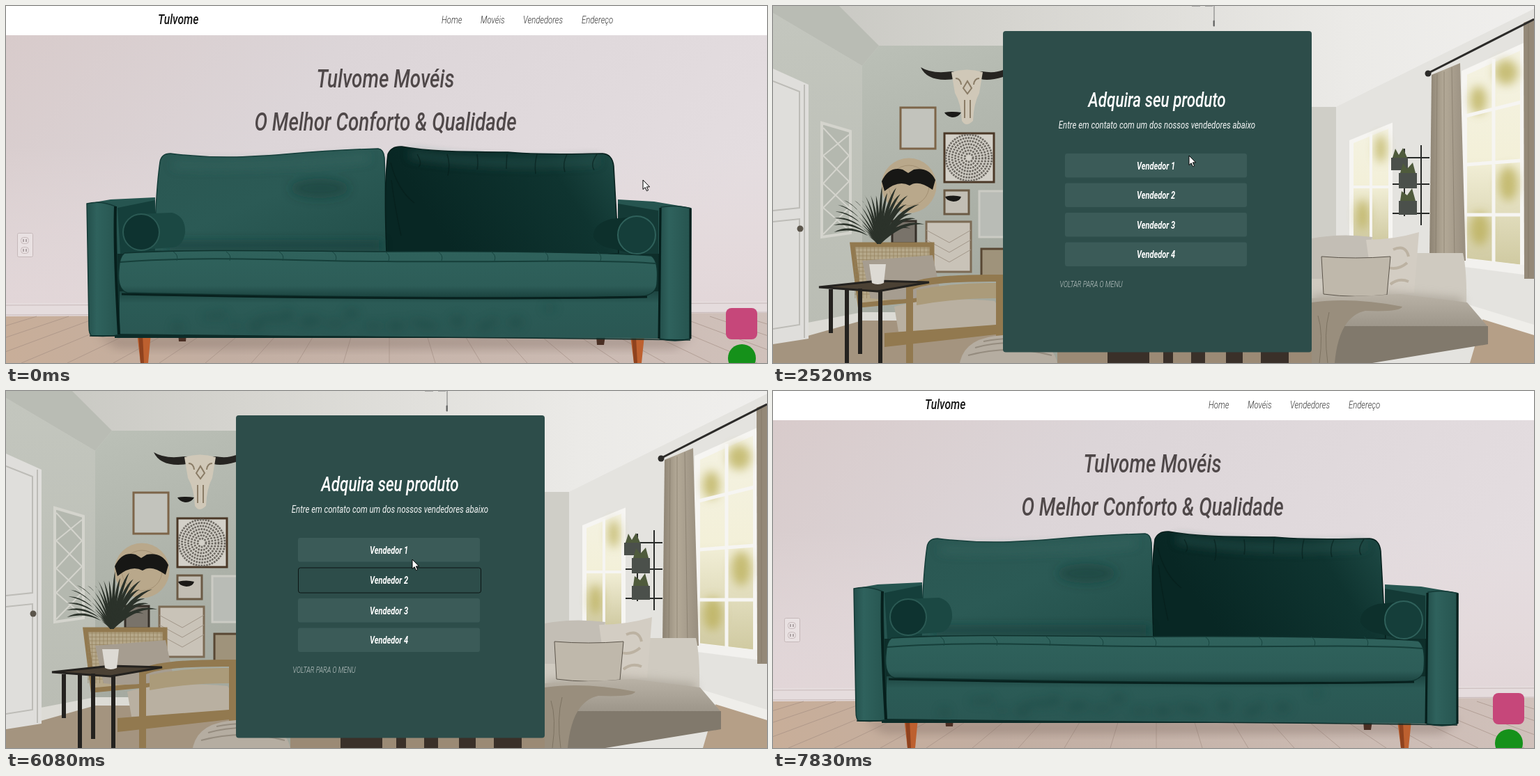
Write an HTML page that moves like this. It is 1092 px wide and 513 px high and loops after 8.49 s.

```html
<!DOCTYPE html>
<html lang="pt">
<head>
<meta charset="utf-8">
<title>Tulvome</title>
<style>
  html, body { margin: 0; width: 100%; height: 100%; overflow: hidden; background: #fff; }
  svg { display: block; width: 100vw; height: 100vh; }
  text { font-family: Roboto, "Open Sans", sans-serif; font-style: italic; }
</style>
</head>
<body>
<svg viewBox="0 0 1092 513" preserveAspectRatio="none">
  <defs>
    <linearGradient id="wall" x2="1" y2=".35">
      <stop stop-color="#d8cbcb"/><stop offset=".4" stop-color="#dcd5d8"/><stop offset="1" stop-color="#e4dde0"/>
    </linearGradient>
    <linearGradient id="wallLow" x2="0" y2="1">
      <stop offset=".4" stop-color="#e6dadb" stop-opacity="0"/><stop offset="1" stop-color="#e2d6d8"/>
    </linearGradient>
    <linearGradient id="floor">
      <stop stop-color="#c8ae99"/><stop offset=".3" stop-color="#c2aea2"/><stop offset="1" stop-color="#d0c1bb"/>
    </linearGradient>
    <linearGradient id="backL" x2=".9" y2="1">
      <stop stop-color="#2a5752"/><stop offset=".5" stop-color="#2b5a55"/><stop offset="1" stop-color="#23504b"/>
    </linearGradient>
    <linearGradient id="backR" x2="1" y2="-.3">
      <stop stop-color="#082724"/><stop offset=".6" stop-color="#0f3430"/><stop offset="1" stop-color="#24524d"/>
    </linearGradient>
    <linearGradient id="seat" x2="0" y2="1">
      <stop stop-color="#2f625c"/><stop offset=".75" stop-color="#2d5d58"/><stop offset="1" stop-color="#1a423e"/>
    </linearGradient>
    <linearGradient id="base" x2="0" y2="1">
      <stop stop-color="#1d4541"/><stop offset=".25" stop-color="#2b5b56"/><stop offset="1" stop-color="#2a5753"/>
    </linearGradient>
    <linearGradient id="arm">
      <stop stop-color="#234f4b"/><stop offset=".3" stop-color="#2f625d"/><stop offset="1" stop-color="#26544f"/>
    </linearGradient>
    <linearGradient id="roomWall" x2=".3" y2="1">
      <stop stop-color="#bbc0b7"/><stop offset=".5" stop-color="#adb2a9"/><stop offset="1" stop-color="#a0a59b"/>
    </linearGradient>
    <linearGradient id="sideWall" x2="0" y2="1">
      <stop stop-color="#c3c6be"/><stop offset="1" stop-color="#b9bcb3"/>
    </linearGradient>
    <linearGradient id="ceil">
      <stop stop-color="#c6c6c0"/><stop offset=".3" stop-color="#d5d4cf"/><stop offset=".75" stop-color="#ebeae7"/><stop offset="1" stop-color="#f0efed"/>
    </linearGradient>
    <linearGradient id="glass" x2="0" y2="1">
      <stop stop-color="#f4f2e2"/><stop offset=".5" stop-color="#f3f0d9"/><stop offset="1" stop-color="#cfc9a0"/>
    </linearGradient>
    <linearGradient id="drape">
      <stop stop-color="#8c8272"/><stop offset=".4" stop-color="#b3a997"/><stop offset="1" stop-color="#988e7f"/>
    </linearGradient>
    <linearGradient id="chaise" x2="0" y2="1">
      <stop stop-color="#b9b2a6"/><stop offset="1" stop-color="#9c9589"/>
    </linearGradient>
    <filter id="soft" x="-50%" y="-50%" width="200%" height="200%"><feGaussianBlur stdDeviation="7"/></filter>
  </defs>

  <g id="home">
    <rect y="42" width="1092" height="471" fill="url(#wall)"/>
    <rect y="42" width="1092" height="400" fill="url(#wallLow)"/>
    <path d="M0 427L1092 424V442L0 446Z" fill="#e5dcdd"/>
    <path d="M0 430L1092 427M0 444L1092 440" stroke="#c7b9b9" fill="none"/>
    <path d="M0 446L1092 441V513H0Z" fill="url(#floor)"/>
    <g id="planks" stroke="#a08b80" stroke-width="1" opacity=".6"/>
    <path d="M130 474H985L960 492H160Z" fill="#7a675e" opacity=".4" filter="url(#soft)"/>
    <g stroke="#c5b8b9" fill="#e9e1e2">
      <rect x="16.500" y="326.500" width="22" height="34" rx="2"/>
      <rect x="21.500" y="332.500" width="11" height="9" rx="4"/><rect x="21.500" y="346.500" width="11" height="9" rx="4"/>
      <path d="M25 335v4m4-4v4M25 349v4m4-4v4" stroke="#75686a"/>
    </g>
    <path d="M247 470h12l-1 12h-10zM847 474h13l-2 13h-10z" fill="#4a2f24"/>
    <path d="M188 470h20l-4 43h-11z" fill="#bd602f"/><path d="M896 474h20l-4 39h-11z" fill="#bd602f"/>
    <path d="M190 472h6l2 41h-5zM898 476h6l2 37h-5z" fill="#8f421e"/>

    <path d="M156 345H942V477H156Z" fill="#0e2e2a"/>
    <path d="M116 284L150 278L214 275L216 356H160Z" fill="#265550"/>
    <path d="M160 290L214 279V356H164Z" fill="#153f3b"/>
    <path d="M983 290L930 281L878 278V356H940Z" fill="#265550"/>
    <path d="M936 294L878 284V356H936Z" fill="#143a36"/>
    <path d="M213 352C214 300 217 252 221 224Q223 212 236 212C300 220 350 217 400 213C460 208 500 206 534 205Q542 206 543 218L547 354Z" fill="url(#backL)" stroke="#143d39" stroke-width="1.500"/>
    <path d="M546 356C544 300 543 250 548 213Q553 201 568 202C620 211 670 209 720 210C780 215 820 212 856 212Q870 213 872 230L879 356Z" fill="url(#backR)" stroke="#061f1c" stroke-width="1.500"/>
    <g filter="url(#soft)">
      <ellipse cx="450" cy="262" rx="42" ry="14" fill="#153e3a" opacity=".5"/>
      <path d="M240 228Q370 232 520 218" stroke="#3c6c66" stroke-width="9" fill="none" opacity=".5"/>
      <path d="M580 213Q700 232 850 222" stroke="#2f5d57" stroke-width="8" fill="none" opacity=".7"/>
      <path d="M230 344H540" stroke="#163e3a" stroke-width="8"/>
    </g>
    <path id="folds" stroke="#071f1c" stroke-width="1.500" fill="none" opacity=".6"/>
    <path d="M186 299L238 297Q258 302 257 326Q254 345 238 347L194 350Z" fill="#1b4843"/>
    <ellipse cx="194" cy="325" rx="26" ry="26" fill="#0e3330" stroke="#2b5a54" stroke-width="2"/>
    <path d="M914 302L868 306Q842 313 843 332Q850 346 872 349L902 357Z" fill="#0d302c"/>
    <ellipse cx="905" cy="329" rx="27" ry="27" fill="#153e3a" stroke="#2f615b" stroke-width="2"/>

    <path d="M163 410H938V478Q560 476 163 471Z" fill="url(#base)"/>
    <path d="M170 355C270 349 390 352 545 353C700 352 860 354 926 359Q937 366 934 400Q932 417 905 418C650 421 400 417 174 412Q159 408 162 378Q163 360 170 355Z" fill="url(#seat)" stroke="#0f322e" stroke-width="1.500"/>
    <path d="M164 368C300 358 420 367 545 367C700 369 850 363 933 370" stroke="#163f3a" stroke-width="2" fill="none"/>
    <path id="tufts" stroke="#184540" fill="none"/>
    <path d="M166 414C400 419 700 422 920 418" stroke="#08211e" stroke-width="3" fill="none"/>
    <g id="scuffs" fill="#163f3b" opacity=".32" filter="url(#soft)"/>
    <path d="M116 284Q136 279 157 288L163 470Q160 476 123 474Q119 472 119 460Z" fill="url(#arm)" stroke="#143a36" stroke-width="1.500"/>
    <path d="M157 288Q155 350 162 472" stroke="#061f1c" stroke-width="4" fill="none"/>
    <path d="M940 289Q962 285 983 291L982 478Q960 484 938 478Z" fill="url(#arm)" stroke="#143a36" stroke-width="1.500"/>
    <path d="M939 290L937 478M982 291V478" stroke="#061f1c" stroke-width="3" fill="none"/>
    <path d="M120 474Q560 474 982 480" stroke="#0d2b28" stroke-width="1.500" fill="none"/>

    <rect width="1092" height="42" fill="#fff"/>
    <rect id="underline" x="741" y="29" height="1" fill="#222"/>
    <rect x="1033" y="434" width="45" height="45" rx="8" fill="#c6477a"/>
    <circle cx="1056" cy="506" r="20" fill="#15911a"/>
  </g>

  <g id="room">
    <rect width="1092" height="513" fill="url(#ceil)"/>
    <path d="M0 0H95L152 57L128 86L0 10Z" fill="#b9bcb4"/>
    <path d="M0 10L128 86V513H0Z" fill="url(#sideWall)"/>
    <path d="M128 86L152 57H560V513H128Z" fill="url(#roomWall)"/>
    <path d="M770 145H808L1092 4V513H770Z" fill="#e4e3df"/>
    <path d="M770 145H808V340H770Z" fill="#cfcec7"/>
    <path d="M0 470L130 448H330V513H0Z" fill="#a4947f"/>
    <path d="M50 455L128 440H200V452H128L50 474Z" fill="#dcdbd5"/>
    <path d="M0 90L51 113V478L0 486Z" fill="#dfdedb"/>
    <path d="M45 113V477M0 108L38 123V290L0 294M0 310L38 306V458L0 464" stroke="#bdbcb7" stroke-width="2" fill="none"/>
    <circle cx="39" cy="320" r="4.500" fill="#5b554b"/>
    <path d="M633 0V29" stroke="#777"/><path d="M632 21h1.500v8h-1.500zM601 0h12M620 0h11" stroke="#777" fill="#444"/>

    <path d="M70 168L111 180V326L70 332Z" fill="#b4b8af" stroke="#d4d4cd" stroke-width="4"/>
    <path d="M72 175L109 215L72 255L109 290L72 328M109 185L72 215L109 252L72 290L109 322" stroke="#d4d4cd" stroke-width="2" fill="none"/>
    <g id="frames" stroke-width="3"/>
    <g id="rings" fill="none" stroke="#6f6b64"/>
    <path d="M220 322l33 18l31-18m-64 14l33 18l31-18m-64 14l33 18l31-18" stroke="#a2978a" fill="none"/>
    <circle cx="195" cy="258" r="39.500" fill="#b9a88b"/>
    <circle cx="195" cy="258" r="29" fill="none" stroke="#a39073" stroke-width="1"/>
    <path d="M156 252Q166 230 186 235L194 240L202 235Q224 231 233 250L229 264Q208 249 196 258Q180 249 160 266Z" fill="#171715"/>
    <path d="M246 153q12-2 24 0q-4 7-12 7q-9-1-12-7zM247 274q12-3 23 0q-2 7-11 7q-10-1-12-7z" fill="#1a1917"/>
    <path d="M212 88Q228 98 256 94H300Q318 97 330 92V102Q310 108 298 105H260Q222 110 212 88Z" fill="#262421"/>
    <path d="M256 95Q278 88 301 95L296 125Q288 140 287 165Q277 175 271 165Q270 140 261 125Z" fill="#d0c8b8"/>
    <path d="M262 104q7 0 8 9M296 104q-7 0-8 9M273 118l6-10l6 10l-6 8zM275 135v26M283 135v26" stroke="#8a7c66" stroke-width="2" fill="none"/>

    <path d="M114 343H228V420L125 430Z" fill="#b5a789" stroke="#92794f" stroke-width="7"/>
    <path id="cane" stroke="#94815d" stroke-width=".7" fill="none"/>
    <g id="palm" fill="#2b322a"/>
    <path d="M128 366Q180 362 229 358L241 414Q180 426 140 420Z" fill="#a69d90"/>
    <path d="M174 432Q230 416 318 424Q330 440 318 462L180 468Z" fill="#b9b0a1"/>
    <path d="M196 513V404Q220 390 325 391V485" stroke="#92794f" stroke-width="10" fill="none"/>
    <path d="M206 408Q260 397 320 398V420Q260 420 206 430Z" fill="#ab9b7a"/>
    <path d="M160 470L320 458V472L160 490Z" fill="#92794f"/>
    <path d="M66 404L150 395L224 397L150 410Z" fill="#4b4134" stroke="#24221f" stroke-width="3"/>
    <path d="M106 408V513M154 410V513M83 407V470M125 406V500" stroke="#24221f" stroke-width="6"/>
    <path d="M138 371H162L159 398Q150 402 142 398Z" fill="#dddad4"/>
    <path d="M268 513Q275 476 330 473Q400 474 408 513Z" fill="#b5ada1"/>
    <path d="M280 502q60-16 120 0M290 491q50-14 102 0M302 482q40-8 76 0" stroke="#958c7f" stroke-width="2" fill="none"/>
    <rect x="408" y="495" width="366" height="18" fill="#9b8a75"/>
    <path d="M480 495h60v18h-60zM560 495h14v18h-14zM600 495h20v18h-20zM650 495h24v18h-24zM700 495h40v18h-40z" fill="#3a3029"/>

    <path d="M830 195L886 172V340H830Z" fill="url(#glass)" stroke="#f6f5f2" stroke-width="6"/>
    <path d="M992 96L1076 58V376L992 366Z" fill="url(#glass)" stroke="#f6f5f2" stroke-width="8"/>
    <g fill="#b9ad55" filter="url(#soft)" opacity=".75">
      <ellipse cx="872" cy="205" rx="8" ry="20"/><ellipse cx="846" cy="300" rx="9" ry="22"/>
      <ellipse cx="1052" cy="95" rx="17" ry="18"/><ellipse cx="1012" cy="135" rx="12" ry="20"/>
      <ellipse cx="1055" cy="255" rx="14" ry="25"/><ellipse cx="1014" cy="320" rx="14" ry="24"/>
    </g>
    <path d="M858 184V340M830 260H886" stroke="#f6f5f2" stroke-width="4"/>
    <path d="M1034 76V372M994 158L1074 138M994 228L1074 222M994 300L1074 300" stroke="#f6f5f2" stroke-width="5"/>
    <path d="M889 218H942M889 256H942M889 298H942M930 200V315M906 205V302" stroke="#292b29" stroke-width="2"/>
    <path d="M887 218h24v18h-24zM898 240h26v22h-26zM898 280h26v20h-26z" fill="#4b504b"/>
    <path d="M889 218l4-13l5 9l6-10l6 14zM900 240l4-14l6 8l8-9l4 15zM900 280l2-14l8 6l7-10l5 18z" fill="#4f5b3c"/>
    <path d="M985 362L1092 374V388L985 374Z" fill="#f2f1ee"/>
    <path d="M945 99L986 82L994 366H942Z" fill="url(#drape)"/><path d="M1077 24L1092 18V392H1078Z" fill="#948978"/>
    <path d="M953 98L951 364M963 94V364M974 88L978 364M1084 22V390" stroke="#7d7363" opacity=".6"/>
    <path d="M939 97L1092 19" stroke="#2c2b29" stroke-width="3"/><circle cx="940" cy="97" r="4.500" fill="#2c2b29"/>
    <path d="M1020 445L1092 470V513H1000Z" fill="#b59f87"/><path d="M985 425L1092 458V473L985 440Z" fill="#efeeea"/>

    <path d="M773 355H990Q996 380 995 432H773Z" fill="#cfcac0"/>
    <path d="M773 334Q815 326 860 332L854 392H773Z" fill="#c3beb5"/>
    <path d="M851 336Q890 336 927 325L920 412L862 416Z" fill="#d3cdc3"/>
    <path d="M890 350q18-8 22 10M880 375q16 6 30-6M886 400q12-10 26-4" stroke="#bcb2a2" stroke-width="4" fill="none"/>
    <path d="M773 416L862 410L990 420V436H773Z" fill="#8f877a" filter="url(#soft)" opacity=".5"/>
    <path d="M787 360Q835 364 886 360L881 415Q835 420 790 414Z" fill="#bfb8ab" stroke="#5c554b"/>
    <path d="M773 420L900 414L996 426L1025 460L800 462L773 450Z" fill="url(#chaise)"/>
    <path d="M800 460H1026V486L860 513H800Z" fill="#81796c"/>
    <path d="M773 426Q830 418 903 432Q900 440 850 438Q812 446 806 513H773Z" fill="#998e7d"/>
    <path d="M782 445Q790 470 784 513M798 440Q790 470 796 513" stroke="#7d7362" fill="none"/>

    <rect id="panel" x="330" width="443" rx="4" fill="#2d4d4a"/>
  </g>

  <g id="cursor" stroke="#000" stroke-width="1" stroke-linejoin="round" fill="#fff">
    <path id="arrow" d="M0 0V13.500L3.200 10.700L5.400 15.700L7.600 14.700L5.400 9.900H9.600Z"/>
    <path id="hand" d="M-1.300 1.300Q0-.6 1.300 1.300V6.300Q2.800 5.400 3.800 6.900Q5.200 6.100 6.200 7.600Q8.300 7.300 8.500 9.500Q8.600 13 7 16V19H-.5V17L-4.300 12.300Q-4.300 10.200-2.700 10.800L-1.300 12.300ZM1.300 6.300V10M3.800 6.900V10M6.200 7.600V10.500"/>
  </g>
</svg>
<script>
const LOOP = 8490, TO_ROOM = 1850, TO_HOME = 7830;
const NARROW = 0.745; // the condensed face
const $ = id => document.getElementById(id);
const clamp = v => Math.min(1, Math.max(0, v));
const ease = k => k * k * (3 - 2 * k);

function add(parent, tag, attrs) {
  const el = document.createElementNS('http://www.w3.org/2000/svg', tag);
  set(el, attrs);
  parent.appendChild(el);
  return el;
}
function set(el, attrs) {
  for (const k in attrs) el.setAttribute(k, attrs[k]);
}
function place(el, x, y, scale = 1) {
  el.setAttribute('transform', `translate(${x} ${y}) scale(${NARROW * scale} ${scale})`);
}
function label(parent, str, x, y, size, weight, fill, anchor = 'middle') {
  const el = add(parent, 'text', { 'font-size': size, 'font-weight': weight, fill, 'text-anchor': anchor });
  el.textContent = str;
  place(el, x, y);
  return el;
}
let seed = 7;
const rnd = () => (seed = seed * 16807 % 2147483647) / 2147483647;

// Details of the sofa picture
const home = $('home'), room = $('room');
for (let i = -16; i <= 16; i++)
  add($('planks'), 'path', { d: `M${550 + i * 46} 446L${550 + i * 66} 513` });
let d = '';
for (let i = 0; i < 7; i++) d += `M${590 + i * 43} 213q${8 - i * 3} 14 ${2 - i} ${18 + rnd() * 14}`;
$('folds').setAttribute('d', d + 'M552 225q10 40 34 58M553 250q5 40 14 80');
d = '';
for (let i = 0; i < 9; i++) d += `M${240 + i * 76} 353q8 5 5 13`;
$('tufts').setAttribute('d', d);
for (let i = 0; i < 22; i++)
  add($('scuffs'), 'ellipse', { cx: 190 + rnd() * 720, cy: 432 + rnd() * 30, rx: 5 + rnd() * 12, ry: 4 + rnd() * 6 });

// Details of the room picture
[[183, 146, 50, 59, '#c2c3bc', '#7d6549'], [246, 183, 71, 70, '#d3d0c8', '#4b3827'],
 [246, 265, 35, 34, '#c2beb4', '#6b5a45'], [171, 309, 34, 32, '#79736a', '#352f28'],
 [220, 310, 64, 72, '#c9c3b8', '#7c6b55'], [296, 266, 40, 66, '#b9bcb6', '#cbcbc4'],
 [299, 349, 38, 42, '#9f937b', '#584733']].forEach(([x, y, width, height, fill, stroke]) =>
  add($('frames'), 'rect', { x, y, width, height, fill, stroke }));
for (let r = 6; r < 34; r += 4.5)
  add($('rings'), 'circle', { cx: 281, cy: 218, r, 'stroke-width': 2.8, 'stroke-dasharray': '2.600 1.300' });
for (let i = 0; i < 22; i++) {
  const a = Math.PI * (0.93 + i * 0.054), r = 44 + rnd() * 24;
  const x = 152 + Math.cos(a) * r, y = 312 + Math.sin(a) * r * 0.9;
  const mx = 152 + Math.cos(a) * r * 0.5, my = (y + 306) / 2 - 4;
  add($('palm'), 'path', { d: `M150 342Q${mx - 2} ${my - 3} ${x} ${y}Q${mx + 3} ${my + 4} 154 342Z` });
}
d = '';
for (let i = 0; i < 20; i++) d += `M${118 + i * 5.5} 346V420`;
for (let i = 0; i < 13; i++) d += `M117 ${348 + i * 5.5}H226`;
$('cane').setAttribute('d', d);

// Text
label(home, 'Tulvome', 218, 26, 21, 500, '#151515', 'start');
[['Home', 625], ['Movéis', 681], ['Vendedores', 742], ['Endereço', 826]].forEach(([s, x]) =>
  label(home, s, x, 25, 15.2, 300, '#333', 'start'));
label(home, 'Tulvome Movéis', 544.5, 117, 37.3, 500, '#4f4849');
label(home, 'O Melhor Conforto & Qualidade', 544.5, 179, 37.3, 500, '#4f4849');
const title = label(room, 'Adquira seu produto', 551, 144.5, 30.1, 500, '#fff');
const note = label(room, 'Entre em contato com um dos nossos vendedores abaixo', 551, 175.5, 15.3, 400, '#f4f6f6');
const back = label(room, 'VOLTAR PARA O MENU', 411.5, 404, 12.3, 300, '#c3cccb', 'start');
const buttons = [0, 1, 2, 3].map(i => ({
  y: 212 + i * 42.5,
  box: add(room, 'rect', { rx: 3, stroke: '#0c1514' }),
  text: label(room, 'Vendedor ' + (i + 1), 549.5, 0, 14.8, 700, '#fff')
}));

// Pointer: time, x, y, eased
const path = [
  [0, 914, 250], [70, 914, 250], [880, 823, 105, 1], [950, 823, 105], [1300, 783, 25, 1],
  [1900, 783, 25], [2520, 597, 215, 1], [2570, 597, 215], [3360, 575, 272, 1], [3620, 575, 272],
  [3750, 555, 315, 1], [4100, 555, 315], [4440, 570, 351, 1], [4710, 570, 351], [5050, 465, 396, 1],
  [5730, 465, 396], [5880, 562, 275, 1], [6080, 583, 242, 1], [6140, 583, 242], [6200, 586, 232],
  [6560, 522, 383, 1], [6630, 522, 383], [7050, 475, 395, 1], [7190, 475, 395], [7420, 762, 451],
  [7620, 880, 520], [LOOP, 880, 520]
];
// Button, enter, leave
const hovers = [
  [0, 2590, 3020], [1, 3080, 3640], [2, 3700, 4180], [1, 5860, 6150],
  [0, 6190, 6270], [1, 6290, 6370], [2, 6370, 6440]
];

function pointer(t) {
  const i = path.findIndex(p => p[0] > t);
  const [t0, x0, y0] = path[i - 1], [t1, x1, y1, eased] = path[i];
  let k = (t - t0) / (t1 - t0);
  if (eased) k = ease(k);
  return [x0 + (x1 - x0) * k, y0 + (y1 - y0) * k];
}
function glow(i, t) {
  return hovers.reduce((best, [n, enter, leave]) => n !== i ? best :
    Math.max(best, clamp((Math.min(t, leave) - enter) / 200) - Math.max(0, t - leave) / 100), 0);
}
function drawPanel(t) {
  const h = buttons.map((b, i) => glow(i, t));
  const grow = h.map(v => v > 0.5 ? 2 : 0);
  const total = grow.reduce((a, b) => a + b), up = total / 2;
  set($('panel'), { y: 36 - up, height: 461.5 + total });
  place(title, 551, 144.5 - up);
  place(note, 551, 175.5 - up);
  place(back, 411.5, 404 + up);
  let shift = -up;
  buttons.forEach((b, i) => {
    const on = h[i] > 0, half = on ? 0.5 : 0, y = b.y + shift;
    set(b.box, {
      x: 419 + half, y: y + half, width: on ? 262 : 261, height: 34.5 + grow[i] - half,
      fill: on ? '#2d4d4a' : '#3b5b58', 'stroke-opacity': on ? h[i] ** 1.3 : 0
    });
    place(b.text, on && h[i] < 0.6 ? 550.5 : 549.5, y + 22.5 + grow[i] / 2, 1 - 0.08 * Math.sin(Math.PI * h[i]));
    shift += grow[i];
  });
}
function overLink(x, y, inRoom) {
  if (!inRoom) return y < 30 && x > 741 && x < 799;
  return (x > 411 && x < 501 && y > 393 && y < 407) ||
    (x > 419 && x < 681 && buttons.some(b => y > b.y + 4 && y < b.y + 29));
}
function draw(t) {
  const inRoom = t >= TO_ROOM && t < TO_HOME;
  const [x, y] = pointer(t);
  home.style.display = inRoom ? 'none' : '';
  room.style.display = inRoom ? '' : 'none';
  $('underline').setAttribute('width', t < TO_ROOM ? 57 * ease(clamp((t - 1220) / 150)) : 0);
  if (inRoom) drawPanel(t);
  const hand = overLink(x, y, inRoom);
  $('hand').style.display = hand ? '' : 'none';
  $('arrow').style.display = hand ? 'none' : '';
  $('cursor').setAttribute('transform', `translate(${x} ${y})`);
}
const start = performance.now();
function tick() {
  draw((performance.now() - start) % LOOP);
  requestAnimationFrame(tick);
}
tick();
</script>
</body>
</html>
```
